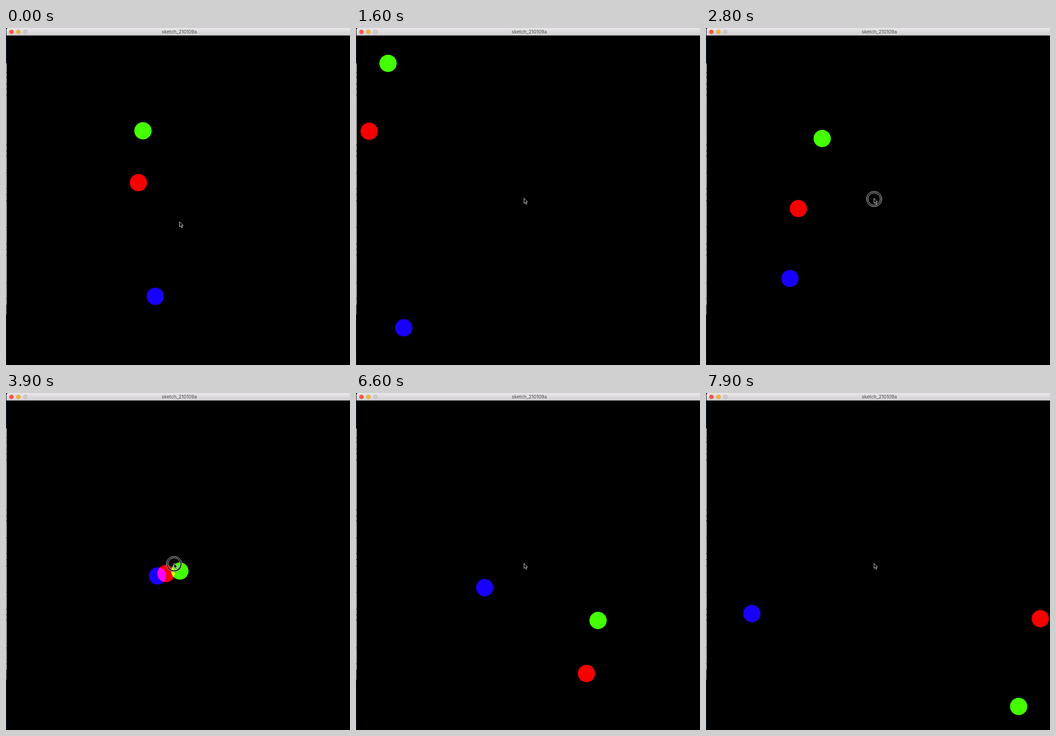
Animation of 756 by 741 pixels, one loop 8 s. Source, as an HTML page:

```html
<!DOCTYPE html>
<html lang="en">
<head>
<meta charset="utf-8">
<title>Bouncing lights</title>
<style>
  html, body { margin: 0; width: 100%; height: 100%; overflow: hidden; background: #000; }
  svg { display: block; width: 756px; height: 741px; }
  .ball { mix-blend-mode: plus-lighter; }
  .title { font: 10.4px Inter, "Liberation Sans", sans-serif; fill: #4b494b; text-anchor: middle; }
</style>
</head>
<body>
<svg viewBox="0 0 756 741">
  <defs>
    <linearGradient id="bar" x2="0" y2="1">
      <stop stop-color="#e9e7e9"/>
      <stop offset="1" stop-color="#d0ced0"/>
    </linearGradient>
  </defs>
  <rect width="756" height="741"/>

  <g id="edge">
    <rect y="16" width="1.5" height="62" fill="#0d1b28"/>
    <rect y="78" width="1.5" height="530" fill="#d6d6d6"/>
    <rect y="608" width="1.5" height="22" fill="#6c7075"/>
    <rect y="630" width="1.5" height="90" fill="#101010"/>
    <rect y="720" width="1.5" height="21" fill="#0d1b28"/>
  </g>

  <g style="isolation:isolate">
    <rect x="2" y="17" width="754" height="724"/>
    <circle class="ball" r="19" fill="#f60000"/>
    <circle class="ball" r="19" fill="#44ff00"/>
    <circle class="ball" r="19" fill="#1800ff"/>
  </g>

  <path d="M1 16.5V4Q1 0 5 0H756V16.5Z" fill="url(#bar)"/>
  <g stroke-width=".6">
    <circle cx="12" cy="8.5" r="4.6" fill="#fc5650" stroke="#df4842"/>
    <circle cx="27.2" cy="8.5" r="4.6" fill="#f6b32d" stroke="#d99d27"/>
    <circle cx="42.5" cy="8.5" r="4.6" fill="#cbc9cb" stroke="#b3b1b3"/>
  </g>
  <text class="title" x="381" y="12.3">sketch_210109a</text>

  <g id="press" fill="none" transform="translate(369.5 376)">
    <circle r="15.4" stroke="#000" stroke-width="3.6"/>
    <circle r="16.7" stroke="#f4f4f4"/>
    <circle r="13.7" stroke="#f4f4f4"/>
  </g>
  <path id="cursor" d="M0 0V11.2L2.6 8.9 4.4 13 6.4 12.2 4.6 8.2H8Z" stroke="#fff" stroke-width=".9"/>
</svg>

<script>
const LOOP = 8000, STEP = 100;           // speeds below are pixels per step
const PRESS = 19, RELEASE = 59, LAUNCH = 58.91;
const PULL = 13.5;
const Y_WALLS = [35.5, 758];

const axis = (start, before, after, walls, center) => ({ start, before, after, walls, center });
const xAxis = (start, before, after, walls) => axis(start, before, after, walls, 382);
const yAxis = (start, before, after) => axis(start, before, after, Y_WALLS, 397);

const balls = [
  [xAxis(291, -17.55, 17.55, [19.5, 743]), yAxis(340, -31, 31)],
  [xAxis(301, -21.15, 21.15, [16.5, 747]), yAxis(226, -14.55, 14.55)],
  [xAxis(328, -13.95, -14, [21, 743]), yAxis(590, 4.33, 4.38)],
];

const clamp = (v, lo, hi) => Math.min(hi, Math.max(lo, v));

function bounce(v, [lo, hi]) {
  if (v < lo) return 2 * lo - v;
  return v > hi ? 2 * hi - v : v;
}

function position(a, n) {
  if (n > RELEASE) return bounce(a.center + a.after * (n - LAUNCH), a.walls);
  const free = bounce(a.start + a.before * Math.min(n, PRESS), a.walls);
  const reach = PULL * Math.max(0, n - PRESS);
  return free + clamp(a.center - free, -reach, reach);
}

// Slivers of text lines from the window behind
const edge = document.getElementById('edge');
for (const y of [98, 108, 123, 134, 147, 257, 270, 281, 318, 353, 366, 380, 438, 475, 487, 499, 560, 595]) {
  const speck = document.createElementNS(edge.namespaceURI, 'rect');
  for (const [k, v] of Object.entries({ y: y - 1, width: 1.2, height: 2.4, fill: '#555' })) speck.setAttribute(k, v);
  edge.append(speck);
}

const dots = document.querySelectorAll('.ball');
const press = document.getElementById('press');
const cursor = document.getElementById('cursor');

function draw(now) {
  const n = Math.floor(now % LOOP / STEP);
  balls.forEach(([x, y], i) => {
    dots[i].setAttribute('cx', position(x, n));
    dots[i].setAttribute('cy', position(y, n));
  });
  press.style.display = n >= PRESS && n < RELEASE ? '' : 'none';
  const k = clamp(n / 7, 0, 1), ease = k * k * (3 - 2 * k);
  cursor.setAttribute('transform', `translate(${381.4 - 12.2 * ease} ${426 - 51.5 * ease})`);
}

const origin = performance.now();
function tick() {
  draw(performance.now() - origin);
  requestAnimationFrame(tick);
}
tick();
</script>
</body>
</html>
```
